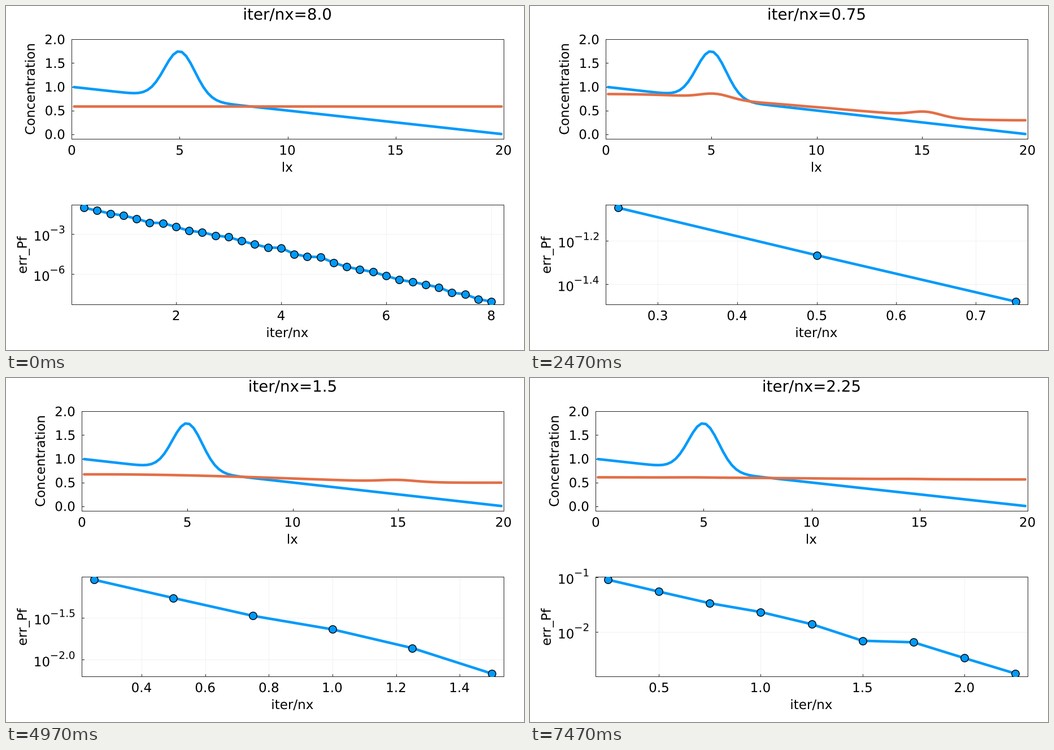
Write a matplotlib script that moves like this. It is 917 px wide and 611 px high and loops after 8 s.

```python
import matplotlib.pyplot as plt
import numpy as np
from matplotlib.animation import FuncAnimation
from matplotlib.lines import Line2D
from matplotlib.patches import PathPatch, Rectangle
from matplotlib.textpath import TextPath
from matplotlib.transforms import Affine2D

W, H, DPI = 917, 611, 64
PT = 72 / DPI  # points per pixel
BLUE, ORANGE = "#009afa", "#e36f47"
TITLE, BODY, SUP = 27.7, 23.05, 18.45
RIGHT = 880.7
TOP, BOTTOM = (59.4, 236.2), (353.3, 529.9)
LEFT = (116.4, 134.4, 145.9)  # by decimals in the exponent labels
GAP = 13.1  # from the left axis to the tick labels

STEP = 20
LOOP = 8000
FIRST, HOLD = 800, 2500 / 3

# points shown: x ticks, y ticks as (first, step, count, decimals)
VIEWS = {
    32: ((2, 2, 4, 0), (-3, -3, 2, 0)),
    1: ((0.4, 0.2, 5, 1), (0, -0.3, 4, 1)),
    2: ((0.25, 0.05, 6, 2), (-1.05, -0.05, 5, 2)),
    3: ((0.3, 0.1, 5, 1), (-1.2, -0.2, 2, 1)),
    4: ((0.4, 0.2, 4, 1), (-1.25, -0.25, 2, 2)),
    5: ((0.4, 0.2, 5, 1), (-1.25, -0.25, 3, 2)),
    6: ((0.4, 0.2, 6, 1), (-1.5, -0.5, 2, 1)),
    7: ((0.4, 0.2, 7, 1), (-1.5, -0.5, 2, 1)),
    8: ((0.5, 0.5, 4, 1), (-1.5, -0.5, 3, 1)),
    9: ((0.5, 0.5, 4, 1), (-1, -1, 2, 0)),
}


def solve(lx=20.0, nx=100, checks=32):
    """Damped-wave relaxation of a 1D diffusion problem with closed ends."""
    dx = lx / nx
    cfl, re = 1 / np.sqrt(2.1), 2 * np.pi
    theta = lx / re / cfl / dx
    beta = re / (cfl * dx * lx)
    x = (np.arange(nx) + 0.5) * dx
    c = 1 + np.exp(-(x - lx / 4) ** 2) - x / lx
    q = np.zeros(nx + 1)
    start, profiles, errors = c.copy(), [], []
    for i in range(1, checks * nx // 4 + 1):
        q[1:-1] -= (q[1:-1] + np.diff(c) / dx) / (1 + theta)
        c -= np.diff(q) / dx / beta
        if i % (nx // 4) == 0:
            profiles.append(c.copy())
            errors.append(np.log10(np.abs(np.diff(q) / dx).max()))
    return x, start, profiles, np.array(errors)


X, START, PROFILES, ERRORS = solve()

fig = plt.figure(figsize=(W / DPI, H / DPI), dpi=DPI, facecolor="white")
ax = fig.add_axes([0, 0, 1, 1])
ax.set_xlim(0, W)
ax.set_ylim(H, 0)
ax.set_axis_off()


def scale(value, lo, hi, a, b):
    return a + (np.asarray(value) - lo) / (hi - lo) * (b - a)


def line(xs, ys, width, color, clip=None, **style):
    art = ax.add_line(Line2D(xs, ys, lw=width * PT, color=color, **style))
    if clip is not None:
        art.set_clip_path(clip)
    return art


def label(x, y, text, size=BODY, align=0.5, turned=False):
    """Place text on baseline y; align 0 is left, 0.5 centre, 1 right."""
    path = TextPath((0, 0), text, size=size)
    box = path.get_extents()
    move = Affine2D().translate(-box.x0 - align * box.width, 0).scale(1, -1)
    if turned:
        move.rotate_deg(-90)
    move.translate(x, y)
    art = PathPatch(move.transform_path(path), fc="black", lw=0, snap=False)
    return ax.add_patch(art), box.width


def frame_box(left, span):
    top, bottom = span
    clip = Rectangle((left, top), RIGHT - left, bottom - top,
                     transform=ax.transData)
    art = line([left, RIGHT, RIGHT, left, left],
               [top, top, bottom, bottom, top], 1, "#262626", zorder=1)
    return art, clip


def x_tick(x, bottom, text):
    return [line([x, x], [bottom - 4, bottom], 1, "#262626", zorder=1),
            label(x, bottom + 28, text)[0]]


def y_tick(left, y):
    return line([left, left + 4], [y, y], 1, "#262626", zorder=1)


def power_label(left, y, exponent, digits):
    text = f"{exponent:.{digits}f}".replace("-", "\u2212")
    right = left - GAP
    sup, width = label(right, y - 1.2, text, SUP, 1)
    base, _ = label(right - width - 3.1, y + 11.9, "10", BODY, 1)
    return [sup, base]


def draw_profile(left, n):
    top, bottom = TOP
    box, clip = frame_box(left, TOP)
    arts = [box]
    for v in range(0, 21, 5):
        arts += x_tick(scale(v, 0, 20, left, RIGHT), bottom, str(v))
    for v in np.arange(0, 2.1, 0.5):
        y = scale(v, -0.1, 2, bottom, top)
        arts += [y_tick(left, y),
                 label(left - GAP, y + 8.4, f"{v:.1f}", BODY, 1)[0]]
    xs = scale(X, 0, 20, left, RIGHT)
    for data, color in ((START, BLUE), (PROFILES[n - 1], ORANGE)):
        arts.append(line(xs, scale(data, -0.1, 2, bottom, top), 4.6, color,
                         clip, solid_capstyle="round",
                         solid_joinstyle="round"))
    return arts


def limits(data, top):
    lo, hi = data.min(), top if len(data) == 1 else data.max()
    pad = 0.03 * (hi - lo)
    return lo - pad, hi + pad


def draw_errors(left, n):
    top, bottom = BOTTOM
    times, errors = np.arange(1, n + 1) / 4, ERRORS[:n]
    xlim = limits(times, 1.25)
    ylim = limits(errors, np.log10(1 + 10 ** errors[0]))
    (x0, dx, nx, xd), (y0, dy, ny, yd) = VIEWS[n]
    box, clip = frame_box(left, BOTTOM)
    arts = [box]
    for v in x0 + dx * np.arange(nx):
        x = scale(v, *xlim, left, RIGHT)
        arts.append(line([x, x], [top, bottom], 1, "#f1f1f1", zorder=0.5))
        arts += x_tick(x, bottom, f"{v:.{xd}f}")
    for v in y0 + dy * np.arange(ny):
        y = scale(v, *ylim, bottom, top)
        arts.append(line([left, RIGHT], [y, y], 1, "#f1f1f1", zorder=0.5))
        arts += [y_tick(left, y), *power_label(left, y, v, yd)]
    xs = scale(times, *xlim, left, RIGHT)
    ys = scale(errors, *ylim, bottom, top)
    arts.append(line(xs, ys, 4.6, BLUE, clip, solid_joinstyle="round"))
    arts.append(line(xs, ys, 0, BLUE, clip, marker="o", ls="none",
                     markersize=13.5 * PT, markeredgecolor="black",
                     markeredgewidth=1.4 * PT))
    return arts


def draw_view(n):
    left = LEFT[VIEWS[n][1][3]]
    mid = (left + RIGHT) / 2
    arts = draw_profile(left, n) + draw_errors(left, n)
    arts += [
        label(mid, 24.3, f"iter/nx={n / 4}", TITLE)[0],
        label(mid, 294.3, "lx")[0],
        label(mid, 588, "iter/nx")[0],
        label(left - 65.6, sum(TOP) / 2, "Concentration", turned=True)[0],
    ]
    return arts


label(36.7, sum(BOTTOM) / 2, "err_Pf", turned=True)
views = [draw_view(n) for n in VIEWS]


def update(i):
    t = (i + 0.75) * STEP  # changes land on the step that contains them
    shown = 0 if t < FIRST else 1 + int((t - FIRST) // HOLD)
    for k, arts in enumerate(views):
        for art in arts:
            art.set_visible(k == shown)
    return []


anim = FuncAnimation(fig, update, frames=LOOP // STEP, interval=STEP,
                     repeat=True, repeat_delay=0, blit=False)
plt.show()
```
